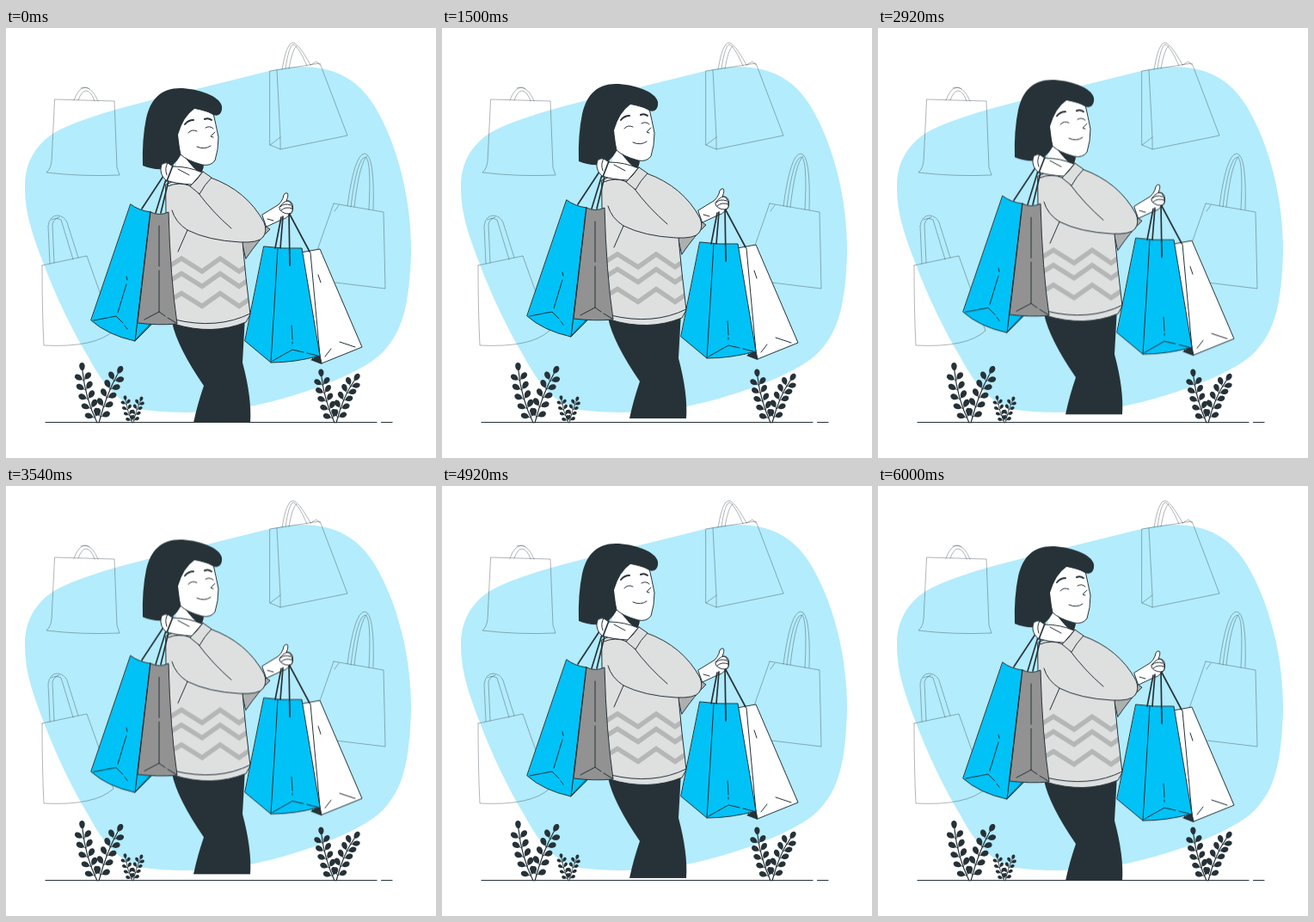
These frames come from a looping animation (500x500 px, 6040 ms). An HTML page with a canvas:

```html
<!DOCTYPE html>
<html lang="en">
<head>
<meta charset="utf-8">
<title>Shopping</title>
<style>
html, body { margin: 0; width: 100%; height: 100%; overflow: hidden; background: #fff; }
canvas { display: block; width: 500px; height: 500px; }
</style>
</head>
<body>
<canvas id="stage"></canvas>
<script>
const LOOP = 6040, LEAD = 100, LIFT = 10, REST = .3;
const INK = '#263238', BLUE = '#00c2f7', PALE = '#b3ecfc', WOOL = '#dee0e0',
      GREY = '#929292', ZIG = '#b5b6b6', WHITE = '#fff';

const stage = document.getElementById('stage');
const dpr = window.devicePixelRatio || 1;
stage.width = stage.height = 500 * dpr;

function painter(canvas) {
  const c = canvas.getContext('2d');
  c.lineCap = c.lineJoin = 'round';
  return {
    c,
    fill(d, color) { c.fillStyle = color; c.fill(new Path2D(d)); },
    line(d, width = 1, color = INK) {
      c.lineWidth = width; c.strokeStyle = color; c.stroke(new Path2D(d));
    },
    shape(d, color, width = 1) { this.fill(d, color); this.line(d, width); }
  };
}

// A curved stem with leaf pairs and one leaf at the tip.
function sprig(p, x0, y0, cx, cy, x1, y1, pairs, len) {
  const { c } = p;
  const at = t => {
    const u = 1 - t;
    return [u * u * x0 + 2 * u * t * cx + t * t * x1,
            u * u * y0 + 2 * u * t * cy + t * t * y1,
            Math.atan2(u * (cy - y0) + t * (y1 - cy), u * (cx - x0) + t * (x1 - cx))];
  };
  const leaf = (x, y, a, l) => {
    c.save();
    c.translate(x, y);
    c.rotate(a);
    c.beginPath();
    c.moveTo(0, 0);
    c.bezierCurveTo(l * .3, -l * .45, l * .95, -l * .42, l, 0);
    c.bezierCurveTo(l * .95, l * .42, l * .3, l * .45, 0, 0);
    c.fill();
    c.restore();
  };
  p.line(`M${x0} ${y0}Q${cx} ${cy} ${x1} ${y1}`, len > 8 ? 1.2 : .8);
  c.fillStyle = INK;
  for (let i = 0; i < pairs; i++) {
    const [x, y, a] = at(.1 + .72 * i / (pairs - 1));
    for (const side of [-1, 1]) {
      const b = a + side * .85, gap = len * .2;
      p.line(`M${x} ${y}l${gap * Math.cos(b)} ${gap * Math.sin(b)}`, .7);
      leaf(x + gap * Math.cos(b), y + gap * Math.sin(b), b, len);
    }
  }
  const [x, y, a] = at(1);
  leaf(x, y, a, len);
}

function drawScene(p) {
  p.fill('M22 184C22 157 34 136 56 122C88 103 160 86 205 75L310 49C365 37 405 52 428 90C455 134 472 200 471 262C469 320 462 352 438 377C414 402 340 429 284 440C235 449 195 448 160 444C128 437 108 406 96 383C76 350 58 312 44 275C30 238 22 215 22 184Z', PALE);

  const faint = [
    'M57 83L126 85L129 162L132 171Q88 173 47 168Q52 164 53 155Z',
    'M79 84Q84 70 92 69Q101 70 107 85M84 84Q88 73 93 73Q99 73 103 85M87 70Q94 68 97 71',
    'M307 50L365 41L397 125L319 141L307 136ZM315 49L319 127L307 136M319 127L319 141M354 43L361 39L365 43',
    'M321 48Q326 18 333 17Q340 17 354 43M325 47Q329 20 334 19Q340 21 350 44M329 47Q333 24 338 21',
    'M381 204L439 214L441 303L383 296M381 204L360 264M387 206L382 213',
    'M397 207Q405 147 417 146Q429 147 427 211M401 208Q408 151 418 150Q425 153 422 211M405 208Q411 156 420 149',
    'M42 276L94 265L125 352Q103 372 44 369Q42 330 42 276',
    'M51 274L49 230Q51 218 60 218Q68 219 71 226L84 267M56 273L54 228Q56 221 62 220M78 269L64 223Q58 220 53 223'
  ];
  faint.forEach(d => p.line(d, .8, 'rgba(38,50,56,.45)'));

  sprig(p, 106, 459, 92, 430, 89, 399, 5, 10);
  sprig(p, 108, 459, 117, 425, 130, 402, 5, 10);
  sprig(p, 147, 459, 141, 446, 139, 433, 4, 5.8);
  sprig(p, 148, 459, 151, 445, 156, 434, 4, 5.8);
  sprig(p, 382, 459, 370, 432, 367, 406, 5, 9.5);
  sprig(p, 384, 459, 392, 428, 405, 410, 5, 9.5);
  p.line('M46 458.5H431M436.500 458.5H449', 1.2);
}

function drawBody(p) {
  const { c } = p;
  p.fill('M193 342Q199 371 230 416Q223 436 218 459H284Q286 430 275 389L278 336Z', INK);

  // far sleeve and hand
  p.shape('M275 250L301 230L307 234Q294 246 279 268Z', '#aeb0b0');
  p.shape('M298 217L316 206Q320 203 322 198Q323 191 327 192Q329 194 326 201Q331 200 333 205Q335 212 331 216Q326 222 318 224L303 231Z', WHITE);

  // torso
  const torso = 'M186 182Q205 172 228 170Q264 184 292 215L275 249L279 290L284 333L279 342Q240 358 195 344L187 290L186 215Z';
  p.fill(torso, WOOL);
  c.save();
  c.clip(new Path2D(torso));
  c.lineCap = 'butt';
  c.lineJoin = 'miter';
  for (const y of [268, 285.5, 308.5])
    p.line(`M188 ${y + 10}L204 ${y}L228 ${y + 15}L249 ${y}L271 ${y + 15}L293 ${y}`, 5.5, ZIG);
  c.restore();
  p.line(torso);
  p.line('M196 339Q246 351 284 332');
}

function drawRightBags(p) {
  p.shape('M343 261L365 257L414 371L367 390L357 386Z', WHITE);
  p.line('M354 261L365 381L367 390M363 287L366 296M371 382L378 373M388 365L406 371');
  p.fill('M354 386L367 391L365 379Z', INK);
  p.shape('M300 254Q322 257 344 256L365 381Q336 389 308 389L278 364Z', BLUE);
  p.line('M316 256L308 389M332 346L333 362M333 365V367M310 387L333 374L346 377M350 378L362 381');
  p.line('M320 220L313 256M322 219L319 256M329 215L330 276M329 215L353 260', 1.7);
  p.shape('M318 208Q325 199 330 202Q335 210 332 215Q325 218 319 212Z', WHITE);
  p.line('M319 208Q323 203 331 206M320 212Q325 207 333 210M304 222L311 224');
}

function drawLeftBags(p) {
  p.shape('M168 214L171 343L150 364Z', BLUE);
  p.shape('M145 205Q154 212 168 214L150 364Q118 357 99 340Z', BLUE);
  p.line('M140 289L141 293M140 298L130 331M102 340L128 335L136 343M138 346L141 350M151 362L168 344');
  p.shape('M168 214Q178 219 189 214Q191 290 199 344Q177 346 153 343Z', GREY);
  p.line('M178 230V277M178 282V330L161 339M178 330L185 335M188 337L198 343M168 214L153 343');
}

function drawArm(p) {
  p.fill('M188 184Q202 178 215 184L238 174Q280 189 300 226Q304 236 299 243Q294 250 272 249Q235 247 211 235Q194 226 191 212Z', WOOL);
  p.line('M238 174Q280 189 300 226Q304 236 299 243Q294 250 272 249Q235 247 211 235Q197 226 193 212M188 184Q202 178 215 184M223 191Q240 214 262 233M211 235L200 260');
}

function drawHead(p) {
  p.fill('M200 140L230 155L230 172L196 173Z', WHITE);
  p.fill('M207 149Q217 157 230 158Q230 166 226 169Q218 164 207 149Z', INK);
  p.shape('M202 116Q207 98 219 93L241 99Q244 112 247 127Q247 142 243 154Q238 161 228 159Q210 154 203 147L198 126Z', WHITE);
  p.fill('M159 160Q158 129 163 105C168 82 181 70 202 70C222 70 249 79 251 91C252 101 245 104 239 100Q229 94 219 94Q206 103 200 124L203 148Q196 161 184 164Q170 165 159 160Z', INK);
  p.line('M208 112Q212 107 218 107M231 106Q235 104 239 107', 2);
  p.line('M212 122Q216 117 222 120M232 116Q237 113 241 117M243 121L238 126L241 127M222 138Q231 142 238 137');
}

function drawNearHand(p) {
  p.line('M191 160L158 210M193 161L180 215M190 163L174 215', 1.7);
  p.shape('M180 162Q181 156 188 157L194 161Q212 161 228 168L216 182Q197 181 186 177Q179 171 180 162Z', WHITE);
  p.line('M188 157Q184 163 187 171M200 164L213 171');
  p.line('M194 160L187 178', 1.7);
  p.shape('M229 167L239 174Q231 182 225 193L214 184Q222 177 229 167Z', WOOL);
}

function layer(draw) {
  const canvas = document.createElement('canvas');
  canvas.width = canvas.height = 500 * dpr;
  const p = painter(canvas);
  p.c.scale(dpr, dpr);
  draw(p);
  return canvas;
}

const scene = layer(drawScene);
const woman = layer(p =>
  [drawBody, drawRightBags, drawArm, drawLeftBags, drawHead, drawNearHand].forEach(f => f(p)));

const view = stage.getContext('2d');
const start = performance.now();

function frame() {
  const t = ((performance.now() - start + LEAD) % LOOP) / LOOP;
  const rise = LIFT * (1 - Math.abs(1 - 2 * t));
  view.fillStyle = WHITE;
  view.fillRect(0, 0, stage.width, stage.height);
  view.drawImage(scene, 0, 0);
  view.drawImage(woman, 0, (REST - rise) * dpr);
  requestAnimationFrame(frame);
}
frame();
</script>
</body>
</html>
```
